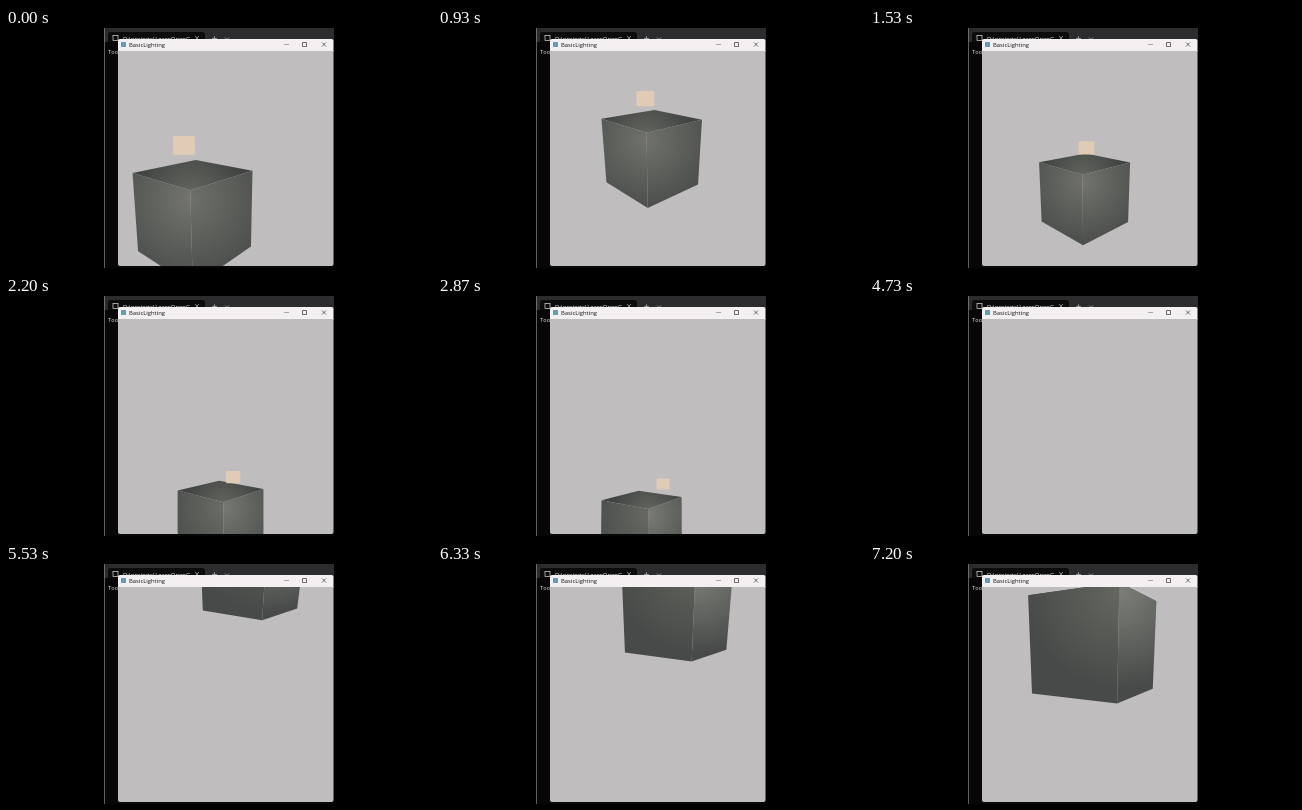
An HTML page that plays this animation: 426x240 px, repeating every 7.27 s.

```html
<!DOCTYPE html>
<html lang="en">
<head>
<meta charset="utf-8">
<title>BasicLighting</title>
<style>
  html, body { margin: 0; width: 100%; height: 100%; overflow: hidden; background: #000; }
  svg { display: block; width: 100%; height: 100%; }
  text { font: 5.9px "Open Sans", "Noto Sans", sans-serif; }
  .mono { font: 5.6px "Noto Sans Mono", "DejaVu Sans Mono", monospace; }
  .line { fill: none; stroke-width: .7; }
</style>
</head>
<body>
<svg viewBox="0 0 426 240">
  <defs>
    <clipPath id="view"><path d="M112 23H327.5V236q0 2-2 2H114q-2 0-2-2Z"/></clipPath>
    <radialGradient id="topShade" gradientUnits="userSpaceOnUse"><stop/><stop offset="1" stop-color="#424443"/></radialGradient>
    <radialGradient id="leftShade" gradientUnits="userSpaceOnUse"><stop/><stop offset="1" stop-color="#484a49"/></radialGradient>
    <radialGradient id="rightShade" gradientUnits="userSpaceOnUse"><stop/><stop offset="1" stop-color="#484a49"/></radialGradient>
  </defs>
  <rect width="426" height="240"/>

  <!-- terminal behind the window -->
  <rect x="98" width="230" height="240" fill="#070707"/>
  <rect x="98" width="230" height="14" fill="#2c2b2d"/>
  <path d="M102 14V7q0-3 3-3H196q3 0 3 3V14Z" fill="#0c0c0c"/>
  <path d="M98.5 0V240" class="line" stroke="#8a877d"/>
  <rect x="107" y="7.5" width="5" height="5" class="line" stroke="#ddd"/>
  <text x="117" y="12.5" fill="#fff">D:\projects\LearnOpenG</text>
  <path d="M189 8l4 4m0-4l-4 4M206 10.5h5m-2.5-2.5v5M219 9.5l2 2 2-2" class="line" stroke="#bbb"/>
  <text x="102" y="25.5" class="mono" fill="#ddd">Too</text>

  <!-- window -->
  <path d="M112 24V13q0-2 2-2H325.5q2 0 2 2V24Z" fill="#f4f0f1"/>
  <rect x="115" y="14" width="5" height="5" fill="#6c9cab"/>
  <text x="123" y="19" fill="#111">BasicLighting</text>
  <path d="M278 16.5h5" class="line" stroke="#888"/>
  <path d="M296.5 14.5h4v4h-4ZM316 14.5l4 4m0-4l-4 4" class="line" stroke="#333"/>
  <g clip-path="url(#view)">
    <rect x="112" y="23" width="216" height="215" fill="#bfbdbe"/>
    <polygon id="top" fill="url(#topShade)"/>
    <polygon id="left" fill="url(#leftShade)"/>
    <polygon id="right" fill="url(#rightShade)"/>
    <rect id="lamp" rx="1.5" fill="#e0ccb6"/>
  </g>
</svg>
<script>
const LOOP = 7270, STEP = 200 / 3;
const CENTRE = { x: 220, y: 130.5 }, FOCAL = 260;

// Camera flight: ms, cube's sideways offset, eye height, distance, yaw and downward pitch in degrees
const flight = [
  [0, -.385, 1.244, 3, 4.5, 11],
  [930, -.095, 1.293, 3.6, -3, 21],
  [2200, -.082, 1.54, 4.28, 4, 0],
  [2870, -.27, 1.525, 4.63, 10, -3],
  [4000, .1, 1, 4.2, 8, 60],
  [5530, .367, .225, 3.97, 6.5, 28.5],
  [7200, .066, -.027, 2.91, 14, 10]
];
const $ = id => document.getElementById(id);

function set(node, attrs) {
  for (const name in attrs) node.setAttribute(name, attrs[name]);
}

function secant(i, k) {
  const a = flight[i], b = flight[i + 1];
  return (b[k] - a[k]) / (b[0] - a[0]);
}

// Tangents are flat at turning points
function slope(i, k) {
  const a = secant(Math.max(i - 1, 0), k);
  const b = secant(Math.min(i, flight.length - 2), k);
  return a * b > 0 ? 2 * a * b / (a + b) : 0;
}

function cameraAt(t) {
  let i = 0;
  while (i < flight.length - 2 && t >= flight[i + 1][0]) i++;
  const a = flight[i], b = flight[i + 1], span = b[0] - a[0];
  const u = Math.min(1, (t - a[0]) / span), v = 1 - u;
  const [, side, height, distance, yaw, pitch] = a.map((p, k) =>
    p * v * v * (1 + 2 * u) + b[k] * u * u * (3 - 2 * u) +
    span * u * v * (slope(i, k) * v - slope(i + 1, k) * u));
  return { side, height, distance, yaw: yaw * Math.PI / 180, pitch: pitch * Math.PI / 180 };
}

function project([x, y, z], cam) {
  const sinYaw = Math.sin(cam.yaw), cosYaw = Math.cos(cam.yaw);
  const sinPitch = Math.sin(cam.pitch), cosPitch = Math.cos(cam.pitch);
  const right = cam.side + x * cosYaw + z * sinYaw;
  const up = y - cam.height;
  const ahead = cam.distance - z * cosYaw + x * sinYaw;
  const scale = FOCAL / (ahead * cosPitch - up * sinPitch);
  return {
    x: CENTRE.x + right * scale,
    y: CENTRE.y - (ahead * sinPitch + up * cosPitch) * scale,
    scale
  };
}

// Quarter turns from the front edge: 0 front, 1 right, 2 back, 3 left
function corner(turn, y) {
  const a = turn * Math.PI / 2;
  return [Math.SQRT1_2 * Math.sin(a), y, Math.SQRT1_2 * Math.cos(a)];
}

function face(id, points, spot, radius, light) {
  set($(id), { points: points.map(p => [p.x, p.y]).join(" ") });
  const shade = $(id + "Shade"), c = Math.round(light);
  set(shade, { cx: spot.x, cy: spot.y + radius * .1, r: radius });
  set(shade.firstElementChild, { "stop-color": `rgb(${c},${c + 2},${c - 5})` });
}

function draw(now) {
  // The small offset settles rounded frame times on the right step
  const t = Math.floor(((now % LOOP) + 4) / STEP) * STEP, s = t / 1000;
  const cam = cameraAt(t);
  const lamp = [.2 - .25 * Math.cos(.6 * s), .87 + .04 * Math.cos(1.5 * s), .65];
  const [front, right, back, left] = [0, 1, 2, 3].map(i => project(corner(i, .5), cam));
  const [frontLow, rightLow, , leftLow] = [0, 1, 2, 3].map(i => project(corner(i, -.5), cam));
  const width = right.x - left.x;
  const lit = side => 86 + 40 * (lamp[2] + side * lamp[0]);

  face("top", [front, right, back, left], front, width * .45, 100);
  face("left", [left, front, frontLow, leftLow], front, width * .75, lit(-1));
  face("right", [front, right, rightLow, frontLow], front, width * .75, lit(1));

  const p = project(lamp, cam), w = .2 * p.scale, h = w * .85;
  set($("lamp"), { x: p.x - w / 2, y: p.y - h / 2, width: w, height: h });
  requestAnimationFrame(() => draw(performance.now() - start));
}

const start = performance.now();
draw(0);
</script>
</body>
</html>
```
